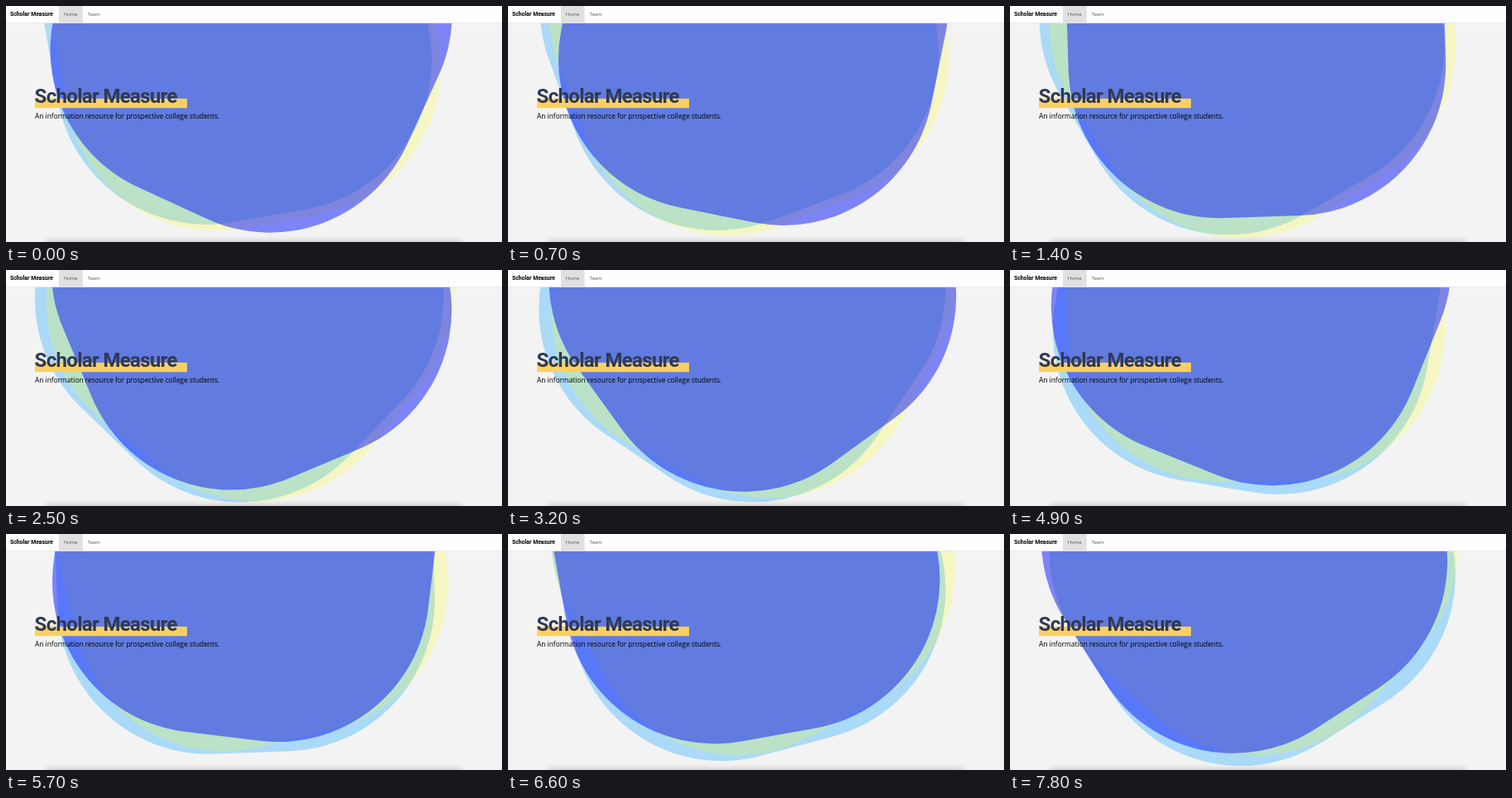
An HTML page that plays this animation: 600 px wide and 285 px high, repeating every 7900 ms.

```html
<!DOCTYPE html>
<html lang="en">
<head>
<meta charset="utf-8">
<title>Scholar Measure</title>
<style>
  html, body { margin: 0; width: 100%; height: 100%; overflow: hidden; background: #f3f3f3; }
  svg { display: block; width: 600px; height: 285px; }
  .brand { font-family: Roboto, sans-serif; font-weight: 700; }
  .title { letter-spacing: -.03em; }
  .text { font-family: "Open Sans", sans-serif; }
</style>
</head>
<body>
<svg viewBox="0 0 600 285">
  <defs>
    <filter id="soft" x="-10%" y="-100%" width="120%" height="300%">
      <feGaussianBlur stdDeviation="4.5"/>
    </filter>
  </defs>
  <rect width="600" height="285" fill="#f3f3f3"/>
  <g id="waves"></g>
  <rect x="48" y="285" width="504" height="30" fill="#000" opacity=".25" filter="url(#soft)"/>

  <rect width="600" height="20.5" fill="#fdfdfd"/>
  <rect y="20" width="600" height=".7" fill="#e6e6e6"/>
  <rect x="64" width="28.7" height="20.2" fill="#e0e0e0"/>
  <text class="brand" x="5" y="12.2" font-size="6.85" fill="#000">Scholar Measure</text>
  <g class="text" font-size="5.9" fill="#555">
    <text x="69.8" y="12.2">Home</text>
    <text x="98.8" y="12.2">Team</text>
  </g>

  <rect x="35" y="111.8" width="184" height="11.4" fill="#fcd060"/>
  <text class="brand title" x="34.6" y="117" font-size="24.1" fill="#2f3953">Scholar Measure</text>
  <text class="text" x="35" y="135.8" font-size="8.36" fill="#000">An information resource for prospective college students.</text>
</svg>
<script>
const LOOP = 7900, STEP = 100;
const SIZE = 456.6;
const PIVOT = { x: 288.4, y: 26.7 };

// start in degrees, speed in degrees per second
const waves = [
  { color: "rgb(0,160,255)", alpha: 0.3, start: 80, speed: -14.4 },
  { color: "rgb(255,255,0)", alpha: 0.2, start: -10, speed: -16.4 },
  { color: "rgb(8,22,252)", alpha: 0.5, start: -65.4, speed: -18.9 }
];

// Each rounded square turns about a point slightly above its centre.
function addWave(wave) {
  const rect = document.createElementNS("http://www.w3.org/2000/svg", "rect");
  const attrs = {
    x: PIVOT.x - SIZE * 0.5, y: PIVOT.y - SIZE * 0.48,
    width: SIZE, height: SIZE, rx: SIZE * 0.4,
    fill: wave.color, "fill-opacity": wave.alpha
  };
  for (const key in attrs) rect.setAttribute(key, attrs[key]);
  document.getElementById("waves").append(rect);
  wave.rect = rect;
}

function render(ms) {
  const seconds = Math.floor((ms % LOOP) / STEP) * STEP / 1000;
  for (const { rect, start, speed } of waves) {
    rect.setAttribute("transform", `rotate(${start + speed * seconds} ${PIVOT.x} ${PIVOT.y})`);
  }
}

waves.forEach(addWave);
render(0);
const begin = performance.now();
function tick() {
  render(performance.now() - begin);
  requestAnimationFrame(tick);
}
requestAnimationFrame(tick);
</script>
</body>
</html>
```
